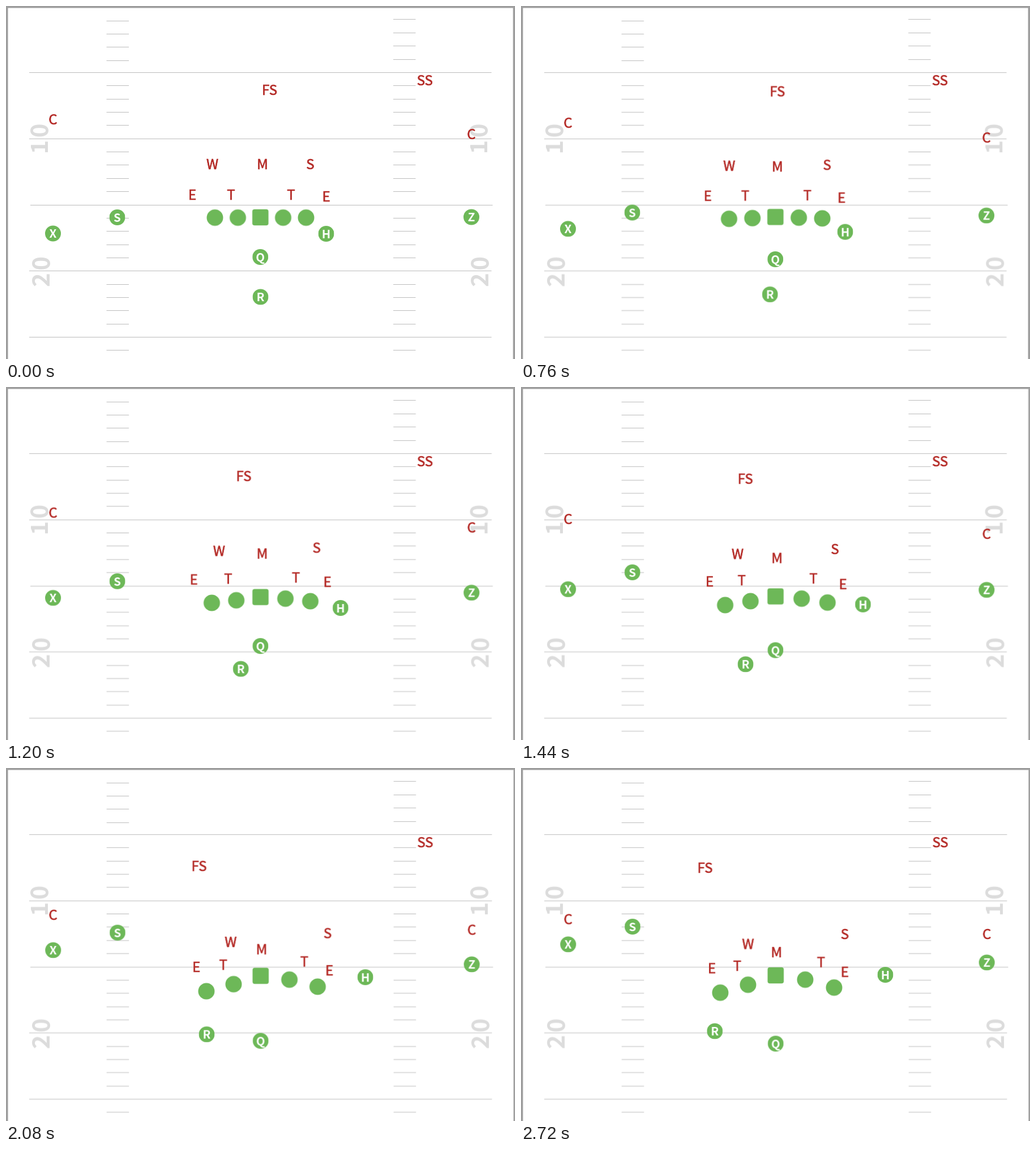
An HTML page for the animation above (2760 ms loop, 899 by 623 pixels).

```html
<!DOCTYPE html>
<html lang="en">
<head>
<meta charset="utf-8">
<title>Play diagram</title>
<style>
  html, body { margin: 0; width: 100%; height: 100%; overflow: hidden; background: #9e9e9e; }
  svg { display: block; width: 899px; height: 623px; }
  text { font-family: "Noto Sans CJK JP", "Noto Sans CJK SC", "Noto Sans CJK", "Noto Sans", sans-serif; }
  .yards { font-size: 42px; font-weight: 700; letter-spacing: 4.5px; fill: #dcdcdc; }
  .lines { fill: #bcbcbc; }
  .player { animation: run 2760ms infinite; }
  .player text { text-anchor: middle; }
  .offense { fill: #6db858; }
  .offense text { font-size: 20.5px; font-weight: 700; fill: #fff; }
  .defense text { font-size: 24px; fill: #b42a26; stroke: #b42a26; stroke-width: .7px; }
  #field { animation: drift 2760ms infinite; }
  @keyframes run {
    0%, 9.42% { transform: translate(var(--from)); animation-timing-function: ease-in-out; }
    95.65%, 100% { transform: translate(var(--to)); }
  }
  @keyframes drift {
    0%, 9.42% { transform: scaleX(1); animation-timing-function: ease-in-out; }
    95.65%, 100% { transform: scaleX(1.001); }
  }
</style>
</head>
<body>
<svg viewBox="0 0 899 623">
  <g id="field">
    <rect x="3.5" y="3.5" width="892" height="630" fill="#fff"/>
    <g class="yards">
      <text transform="translate(74 261.5) rotate(-90)">10</text>
      <text transform="translate(850 261.5) rotate(-90)">10</text>
      <text transform="translate(76.5 496) rotate(-90)">20</text>
      <text transform="translate(852 496) rotate(-90)">20</text>
    </g>
    <g class="lines" id="lines"></g>
  </g>
  <g id="players"></g>
</svg>
<script>
  const NS = 'http://www.w3.org/2000/svg';

  function add(parent, tag, attrs, label) {
    const el = document.createElementNS(NS, tag);
    for (const key in attrs) el.setAttribute(key, attrs[key]);
    if (label) el.textContent = label;
    return parent.appendChild(el);
  }

  const lines = document.getElementById('lines');
  const players = document.getElementById('players');
  const rule = (x, y, width) => add(lines, 'rect', { x, y: Math.floor(y), width, height: 1 });

  // Full lines every five steps, hash marks between them
  for (let k = -4; k <= 21; k++) {
    const y = 117.4 + 23.36 * k;
    if (k % 5 === 0) {
      rule(k === 10 ? 43 : 41, y, 816.5);
    } else {
      rule(177.5, y + (k < 0 ? 2.3 : 0), 39.5);
      rule(684, y, 39.5);
    }
  }

  function player(kind, x0, y0, x1, y1) {
    return add(players, 'g', {
      class: 'player ' + kind,
      style: `--from: ${x0}px, ${y0}px; --to: ${x1}px, ${y1}px`
    });
  }

  // label, start x, start y, end x, end y
  const offense = [
    ['', 369, 373.5, 352, 396.5],
    ['', 409.5, 373.5, 401, 382.5],
    ['', 489.5, 373.5, 502, 373.5],
    ['', 530, 373.5, 553, 387.5],
    ['S', 196.5, 373, 197, 280],
    ['X', 83, 401.5, 83.3, 311.3],
    ['H', 565.5, 402, 643.5, 365],
    ['Z', 822, 372.5, 822.7, 343.3],
    ['Q', 449.2, 443, 449.8, 486.5],
    ['R', 449.5, 513.5, 342.3, 464.5]
  ];
  const defense = [
    ['FS', 465.5, 148, 325, 176],
    ['SS', 739.8, 131, 740.5, 131],
    ['C', 83, 200, 83.2, 266.7],
    ['C', 822, 226, 822.7, 293],
    ['W', 364.5, 279, 401, 310.5],
    ['M', 453, 279, 451.3, 325],
    ['S', 537.5, 279, 572, 293],
    ['E', 329, 333, 337, 353.3],
    ['T', 397.5, 333, 382, 349],
    ['T', 503.5, 333, 530, 342.5],
    ['E', 565.5, 336, 571.7, 359.7]
  ];

  const center = player('offense', 449.3, 373, 449.8, 366);
  add(center, 'rect', { x: -14.3, y: -14.2, width: 28.6, height: 28.4, rx: 4 });

  for (const [label, ...path] of offense) {
    const g = player('offense', ...path);
    add(g, 'circle', { r: label ? 14 : 14.5 });
    if (label) add(g, 'text', { y: 7.5 }, label);
  }
  for (const [label, ...path] of defense) {
    add(player('defense', ...path), 'text', { y: 8.8 }, label);
  }
</script>
</body>
</html>
```
